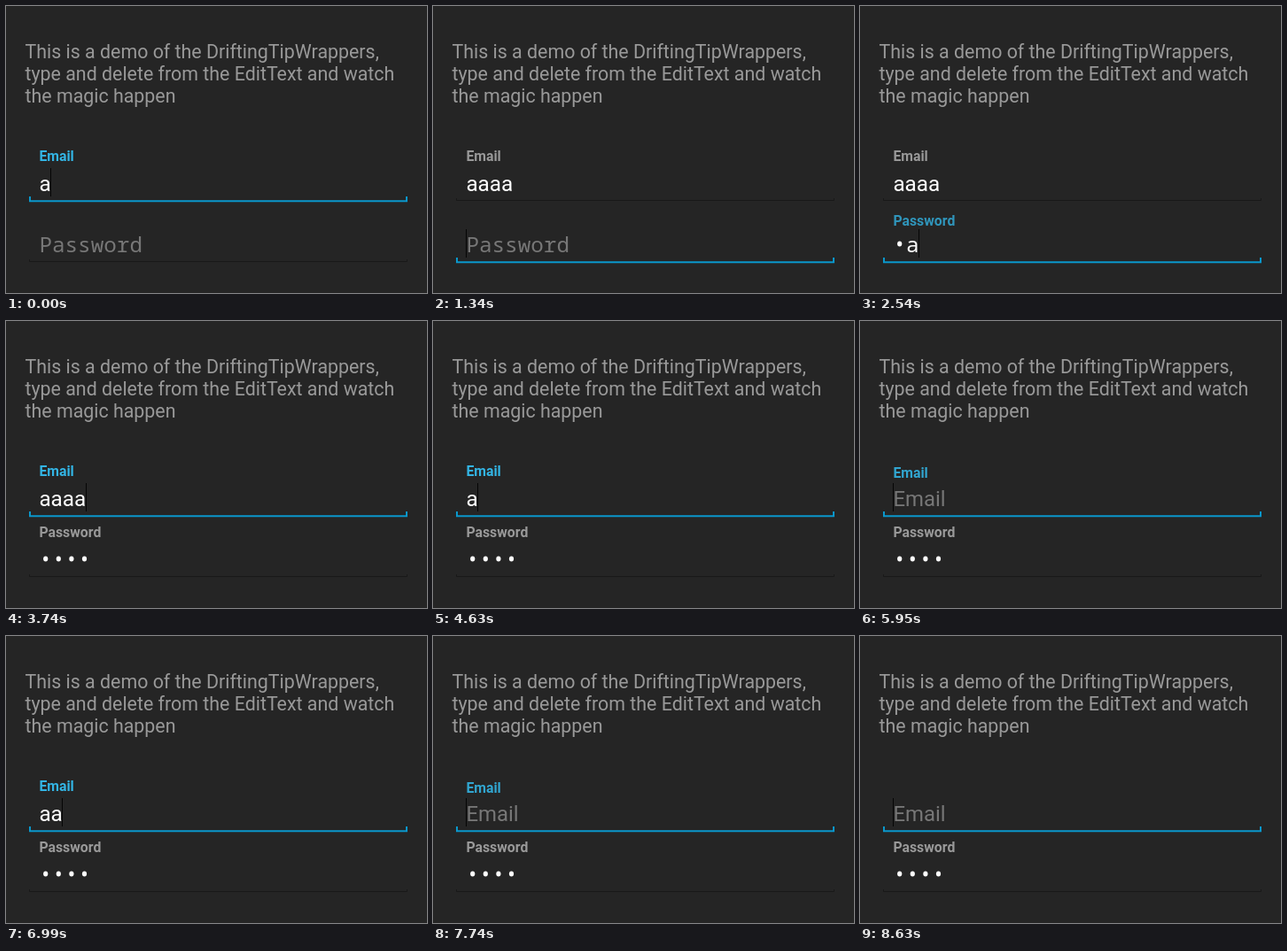
Animation, 475 px wide and 324 px high, one loop 9.19 s. Source, as an HTML page:

```html
<!DOCTYPE html>
<html lang="en">
<head>
<meta charset="utf-8">
<title>Floating hints</title>
<style>
  html, body { margin: 0; width: 100%; height: 100%; overflow: hidden; background: #252525; }
  svg { display: block; width: 475px; height: 324px; font-family: Roboto, sans-serif; }
  .intro { font-size: 21.39px; fill: #999; }
  .label { font-size: 15.8px; font-weight: 700; }
  .value { font-size: 24.3px; fill: #fff; }
  .hint { font-size: 23.9px; fill: #777; }
  .mono { font-family: "Noto Sans Mono", monospace; font-size: 24.3px; }
</style>
</head>
<body>
<svg viewBox="0 0 475 324">
  <g class="intro">
    <text x="21.5" y="58.5">This is a demo of the DriftingTipWrappers,</text>
    <text x="21.5" y="83.8">type and delete from the EditText and watch</text>
    <text x="21.5" y="109">the magic happen</text>
  </g>
</svg>
<script>
const LOOP = 9190, LEFT = 37.4, TICK = 145, FADE = 300;
const svg = document.querySelector('svg');

// [time, number of characters]
const emailKeys = [[-999, 1], [450, 2], [740, 3], [890, 4], [4330, 3], [4480, 2], [4630, 1],
  [4780, 0], [5360, 1], [5660, 2], [5810, 1], [5950, 0], [6250, 1], [6690, 2], [6840, 1],
  [6990, 2], [7440, 1], [7740, 0]];
const passwordKeys = [[-999, 0], [2390, 1], [2540, 2], [2690, 3], [2990, 4]];
const caretOff = [[150, 450], [1940, 2390], [3440, 3740], [4180, 4330], [8180, 8630]];
const within = (t, [from, to]) => t >= from && t < to;

function add(tag, attrs, text = '', parent = svg) {
  const node = document.createElementNS('http://www.w3.org/2000/svg', tag);
  for (const name in attrs) node.setAttribute(name, attrs[name]);
  node.textContent = text;
  return parent.appendChild(node);
}

function show(node, visible) {
  node.setAttribute('visibility', visible ? 'visible' : 'hidden');
}

function makeField(name, top, keys, secret) {
  const group = add('g', { transform: `translate(0 ${top})` });
  const put = (tag, attrs, text) => add(tag, attrs, text, group);
  const font = secret ? ' mono' : '';
  const pitch = secret ? 14.6 : 13.22;
  const label = put('text', { class: 'label', x: LEFT, y: 175 }, name);
  const hint = put('text', { class: 'hint' + font, x: LEFT, y: 209 }, name);
  const value = put('text', { class: 'value' + font, y: 209 });
  const dots = secret ? [0, 1, 2, 3].map(i => put('ellipse',
    { cx: LEFT + pitch * (i + 0.5), cy: 199.4, rx: 2.6, ry: 3, fill: '#fff' })) : [];
  const idleLine = put('path', { d: 'M26.5 217v2.5h426V217', fill: 'none', stroke: '#191919' });
  const focusLine = put('path', { d: 'M26 215h2v4.2h423V215h2v6.2H26z', fill: '#0a97cb' });
  const caret = put('rect', { y: 183, width: 1, height: 32, fill: '#050505' });

  return (t, focused) => {
    let count = keys[0][1], since = keys[0][0];
    for (const [time, n] of keys) {
      if (time > t) break;
      if (!n !== !count) since = time;
      count = n;
    }
    // The label slides and fades in coarse ticks
    const elapsed = Math.floor((t - since) / TICK) * TICK + 62;
    const eased = (1 - Math.cos(Math.PI * Math.min(1, elapsed / FADE))) / 2;
    const shown = count ? eased : 1 - eased;
    label.setAttribute('opacity', shown);
    label.setAttribute('transform', `translate(0 ${19 * (1 - shown)})`);
    label.setAttribute('fill', focused ? '#33b5e5' : '#999');
    show(hint, !count);

    // While typing, a secret field reveals its last character
    const hidden = secret ? count - (focused && count ? 1 : 0) : 0;
    dots.forEach((dot, i) => show(dot, i < hidden));
    value.setAttribute('x', LEFT + pitch * hidden);
    value.textContent = 'a'.repeat(count - hidden);

    show(idleLine, !focused);
    show(focusLine, focused);
    caret.setAttribute('x', Math.floor(LEFT + pitch * count));
    show(caret, focused && !caretOff.some(span => within(t, span)));
  };
}

const drawEmail = makeField('Email', 0, emailKeys, false);
const drawPassword = makeField('Password', 69, passwordKeys, true);

function frame() {
  const t = performance.now() % LOOP;
  const onPassword = within(t, [1340, 3740]);
  drawEmail(t, !onPassword);
  drawPassword(t, onPassword);
  requestAnimationFrame(frame);
}
frame();
</script>
</body>
</html>
```
